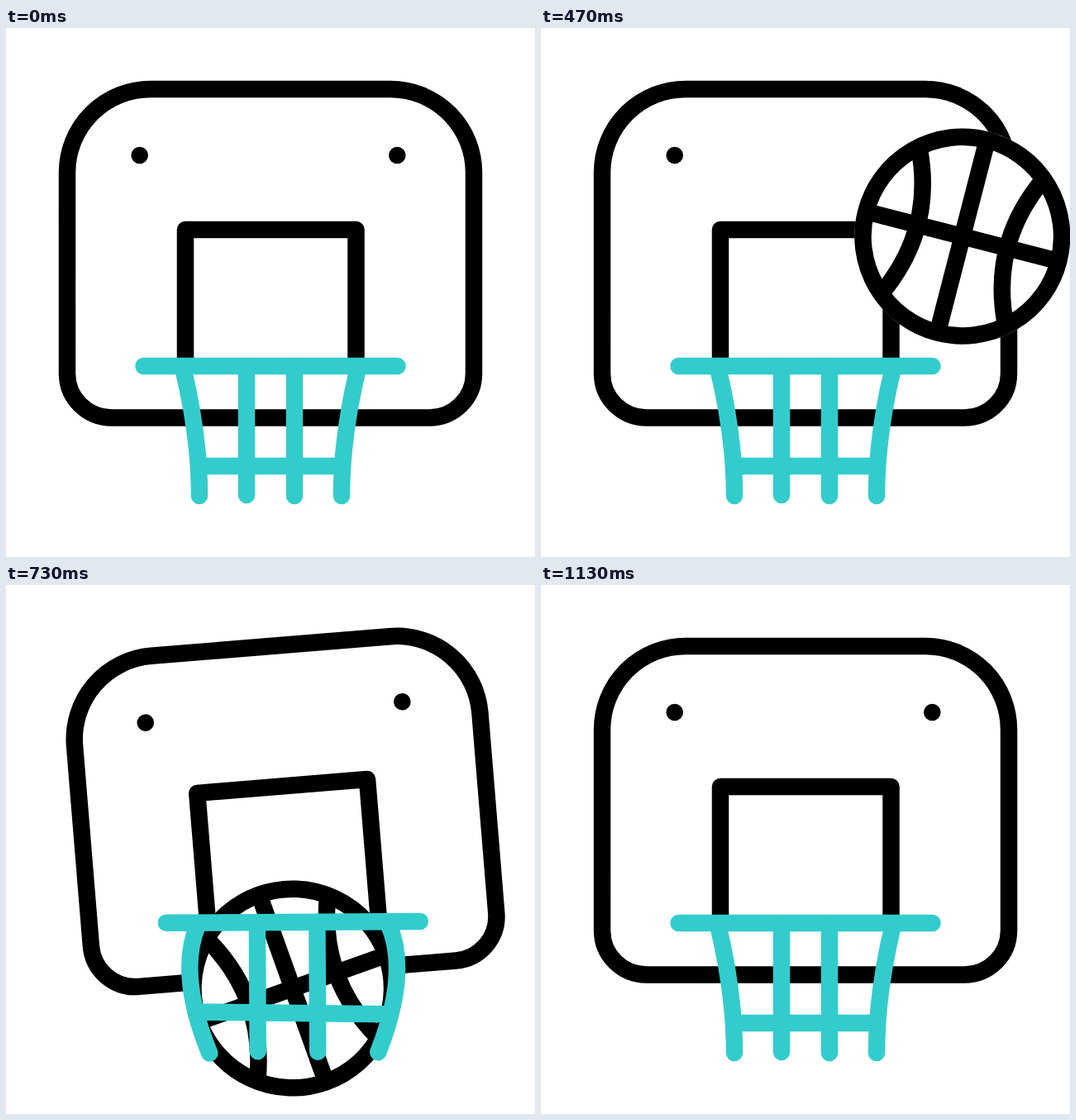
Write an HTML page that moves like this. It is 640 by 640 pixels and loops after 1670 ms.

```html
<!DOCTYPE html>
<html lang="en">
<head>
<meta charset="utf-8">
<title>Basketball hoop</title>
<style>
  html, body { margin: 0; width: 100%; height: 100%; overflow: hidden; background: #fff; }
  svg { display: block; width: 100%; height: 100%; }
  .ink, .cyan { fill: none; stroke: #000; stroke-width: 20.5; stroke-linejoin: round; }
  .cyan { stroke: #3cc; }
  .round { stroke-linecap: round; }
</style>
</head>
<body>
<svg viewBox="0 0 640 640">
  <g id="board">
    <path class="ink" d="M175 74H465A101 101 0 0 1 566 175V418A53.5 53.5 0 0 1 512.5 471.5H127.5A53.5 53.5 0 0 1 74 418V175A101 101 0 0 1 175 74Z"/>
    <path class="ink" d="M217 413V244H423.5V409"/>
    <circle cx="161.7" cy="154" r="10.3"/>
    <circle cx="473.3" cy="154" r="10.3"/>
    <path id="middleDash" class="ink round"/>
    <path id="sideDashes" class="cyan round"/>
  </g>
  <g id="ball">
    <circle r="130.5" fill="#fff"/>
    <circle class="ink" r="120.3"/>
    <path class="ink" d="M-118 0H118M0 -118V118M-92 -78Q0 -34 92 -78M-92 78Q0 34 92 78"/>
  </g>
  <g id="hoop">
    <path id="net" class="cyan round"/>
    <path class="cyan round" d="M-153.5 0H153.5"/>
  </g>
</svg>
<script>
const LOOP = 1670;
const STEPS_PER_MS = .03;
const el = id => document.getElementById(id);
const [board, ball, hoop, net, middleDash, sideDashes] =
  ['board', 'ball', 'hoop', 'net', 'middleDash', 'sideDashes'].map(el);

const progress = (s, from, to) => Math.min(1, Math.max(0, (s - from) / (to - from)));
const smooth = u => u * u * (3 - 2 * u);

// Eases from one value to the next, one value every `gap` steps.
const swing = (s, from, gap, values) => values.slice(1).reduce(
  (sum, v, i) => sum + (v - values[i]) * smooth(progress(s, from + i * gap, from + (i + 1) * gap)),
  values[0]);

// Points the ball passes: step, x, y.
const flight = [
  [6, 764, 372], [11, 643.5, 318], [15, 465, 243], [17, 391, 266],
  [22, 346.7, 488], [25, 330, 633], [28, 318, 800]
];

// Monotone cubic curve through one coordinate of the flight.
function flightAt(s, axis) {
  const last = flight.length - 1;
  const slope = i => (flight[i + 1][axis] - flight[i][axis]) / (flight[i + 1][0] - flight[i][0]);
  const tangent = i => {
    if (i === 0 || i === last) return 0;
    const a = slope(i - 1), b = slope(i);
    return a * b > 0 ? 2 * a * b / (a + b) : 0;
  };
  const next = flight.findIndex(p => p[0] > s);
  if (next < 1) return flight[next ? last : 0][axis];
  const i = next - 1, p = flight[i], q = flight[next];
  const d = q[0] - p[0], u = (s - p[0]) / d;
  return p[axis] + (q[axis] - p[axis]) * smooth(u)
    + d * u * (1 - u) * ((1 - u) * tangent(i) - u * tangent(next));
}

// `full` widens the net around the ball, `swung` throws its left side outwards.
function netPath(full, swung) {
  const bandY = 121 - 11 * full - 5 * swung;
  const flare = { [-1]: 44 * swung, 1: 5 * swung };
  const side = dir => {
    const top = 106 + 9 * full;
    const middle = 86 + 55 * full + 12 * swung;
    const bottom = 86 + 16 * full + flare[dir];
    return `M${dir * top} 2Q${dir * middle} ${85 - 24 * full - 8 * swung} `
      + `${dir * bottom} ${157 + full - .16 * flare[dir]}`;
  };
  const bandEnd = dir =>
    `${dir * (86 + 28 * full + 11 * swung + .35 * flare[dir])} ${bandY + 2 * dir * full}`;
  const innerLeft = -29 - 14.5 * full - 8 * swung;
  return `${side(-1)}${side(1)}M${innerLeft} 0V156M29 0V157M${bandEnd(-1)}L${bandEnd(1)}`;
}

function dash(x0, y0, x1, y1, tail, head) {
  const at = k => `${x0 + (x1 - x0) * k} ${y0 + (y1 - y0) * k}`;
  return head > tail ? `M${at(tail)}L${at(head)}` : '';
}

function draw(ms) {
  const s = Math.floor((ms % LOOP + 3.34) * STEPS_PER_MS);

  const tilt = `rotate(${swing(s, 19, 4, [0, -5.55, 2.6, 0])} 320 74)`;
  const rimTilt = swing(s, 18, 4, [0, 4.35, -9.3, -.3, 0]);
  board.setAttribute('transform', tilt);
  hoop.setAttribute('transform', `${tilt} translate(320 409) rotate(${rimTilt})`);
  net.setAttribute('d', netPath(swing(s, 19, 3, [0, 1, 0]), swing(s, 22, 3, [0, 1, 0])));

  const spin = 13.2 - 368 * smooth(progress(s, 7.8, 27.2));
  ball.setAttribute('transform', `translate(${flightAt(s, 1)} ${flightAt(s, 2)}) rotate(${spin})`);
  ball.style.display = s > 5 && s < 28 ? '' : 'none';

  const head = 1 - (1 - progress(s, 23.6, 31)) ** 2;
  const tail = progress(s, 24, 34) ** 3;
  middleDash.setAttribute('d', dash(324.5, 325, 324.5, 259, tail, head));
  sideDashes.setAttribute('d',
    dash(265.4, 326, 176.5, 181, tail, head) + dash(385.8, 329, 459.9, 188, tail, head));
}

const start = performance.now();
function tick() {
  draw(performance.now() - start);
  requestAnimationFrame(tick);
}
tick();
</script>
</body>
</html>
```
